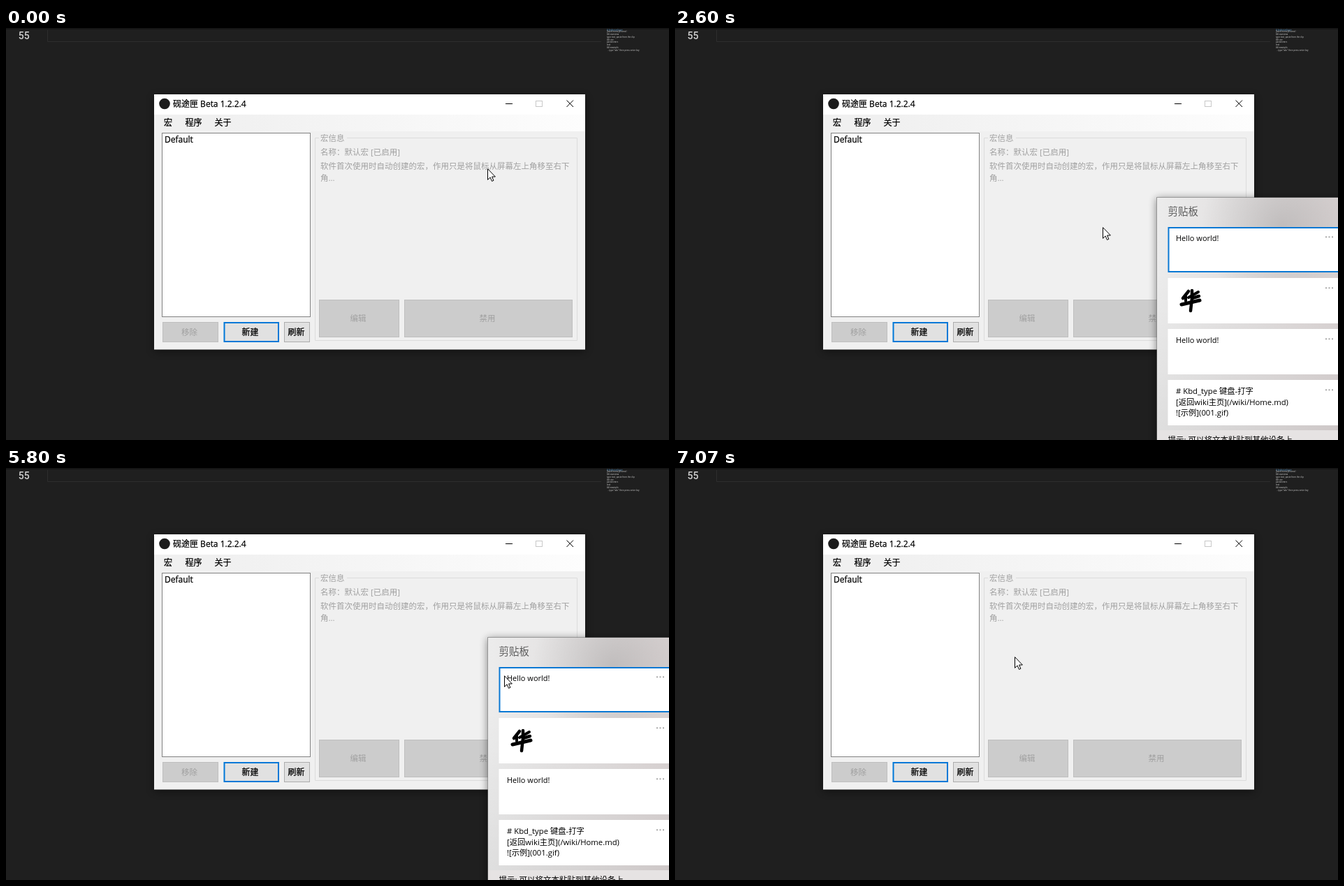
Animation, 949 px wide and 590 px high, one loop 8000 ms. Source, as an HTML page:

```html
<!DOCTYPE html>
<html lang="zh-CN">
<head>
<meta charset="utf-8">
<title>Macro window</title>
<style>
  html, body { margin: 0; width: 100%; height: 100%; overflow: hidden; background: #1f1f1f; }
  svg { display: block; width: 949px; height: 590px; }
  text { font: 11.5px "Open Sans", "Noto Sans CJK SC", "Noto Sans CJK", sans-serif; white-space: pre; }
  .bold { font-size: 12px; stroke: #000; stroke-width: .25px; }
  .grey { fill: #a0a0a0; }
  .mid { text-anchor: middle; }
  .off { fill: #ccc; stroke: #bfbfbf; }
  .clip text { font-size: 11.3px; }
  .clip .head { font-size: 14.5px; fill: #5c5c5c; }
  .clip .hello { font-size: 11px; }
  .clip .tip { font-size: 11.5px; }
  .line-no { font: 500 14px Roboto, sans-serif; fill: #d0d0d0; }
  .map text { font-size: 12px; fill: #d0d0d0; }
  .map .link { fill: #5a9bd0; }

  .px, .py, .panel, .body, .ring { animation: 8s infinite; }
  .px { animation-name: px; animation-timing-function: ease-in-out; }
  .py { animation-name: py; animation-timing-function: ease-in-out; }
  .panel { animation-name: panel; animation-timing-function: step-end; }
  .body { animation-name: body; animation-timing-function: step-end; }
  .ring { animation-name: ring; animation-timing-function: step-end; }

  @keyframes px {
    0%, 9.2% { transform: translateX(689px); }
    16.8% { transform: translateX(587px); }
    20%, 32.1% { transform: translateX(611px); }
    40.5% { transform: translateX(814px); }
    42.5%, 42.8% { transform: translateX(809px); }
    50.3% { transform: translateX(696px); }
    53.4%, 54.1% { transform: translateX(717px); }
    58.6% { transform: translateX(786px); }
    62.4% { transform: translateX(689px); }
    64.1%, 64.9% { transform: translateX(710px); }
    65.9%, 69% { transform: translateX(711px); }
    69.1%, 72.5% { transform: translateX(713px); }
    78%, 80% { transform: translateX(639px); }
    82.5% { transform: translateX(601px); animation-timing-function: ease-out; }
    88.3%, 100% { transform: translateX(486px); }
  }
  @keyframes py {
    0%, 9.2% { transform: translateY(201px); }
    20%, 32.3% { transform: translateY(285px); }
    36% { transform: translateY(274px); }
    41% { transform: translateY(304px); }
    42.5%, 42.8% { transform: translateY(302px); }
    46.4% { transform: translateY(319px); }
    51.2% { transform: translateY(278px); }
    53.4%, 54.1% { transform: translateY(281px); }
    59.5% { transform: translateY(312px); }
    64.1%, 64.9% { transform: translateY(302px); }
    65.9%, 69% { transform: translateY(296px); }
    69.1%, 72.5% { transform: translateY(297px); }
    78%, 80% { transform: translateY(290px); }
    82.5% { transform: translateY(289px); animation-timing-function: ease-out; }
    88.3%, 100% { transform: translateY(270px); }
  }
  @keyframes panel {
    0% { visibility: hidden; }
    24.1% { visibility: visible; }
    79%, 100% { visibility: hidden; }
  }
  @keyframes body {
    0% { opacity: 0; }
    25% { opacity: .65; }
    25.85%, 100% { opacity: 1; }
  }
  @keyframes ring {
    0% { opacity: 0; }
    78.3% { opacity: 1; }
    80%, 100% { opacity: 0; }
  }
</style>
</head>
<body>
<svg viewBox="0 0 949 590" xmlns="http://www.w3.org/2000/svg">
  <defs>
    <linearGradient id="menu">
      <stop offset=".15" stop-color="#f0f0f0"/><stop offset="1" stop-color="#fdfdfd"/>
    </linearGradient>
    <linearGradient id="glass">
      <stop offset="0" stop-color="#ececec"/><stop offset=".4" stop-color="#e4e2e2"/>
      <stop offset="1" stop-color="#dad4d4"/>
    </linearGradient>
    <radialGradient id="smoke" gradientUnits="userSpaceOnUse" cx="868" cy="285" r="115">
      <stop offset="0" stop-opacity=".14"/><stop offset="1" stop-opacity="0"/>
    </radialGradient>
    <linearGradient id="shade" x2="0" y2="1">
      <stop offset=".3" stop-opacity="0"/><stop offset="1" stop-opacity=".06"/>
    </linearGradient>
    <filter id="blur" x="-20%" y="-20%" width="140%" height="140%"><feGaussianBlur stdDeviation="6"/></filter>
    <clipPath id="outside"><path d="M0 0H949V242H689V590H0Z"/></clipPath>
    <g id="dots" fill="#999">
      <rect x="931" width="2" height="1.6"/><rect x="935.5" width="2" height="1.6"/><rect x="940" width="2" height="1.6"/>
    </g>
  </defs>

  <!-- editor -->
  <rect width="949" height="590" fill="#1f1f1f"/>
  <rect width="949" height="2" fill="#151515"/>
  <path d="M59.5 3V19.5H852" fill="none" stroke="#2d2d2d"/>
  <text class="line-no" x="17.8" y="15.6">55</text>
  <g class="map" transform="translate(860 0) scale(.25)">
    <text class="link" y="14"># keyboard type</text>
    <text y="24">[back home](/home)</text>
    <text y="40">## overview</text>
    <text y="56">type text, paste from the clip</text>
    <text y="72">## use</text>
    <text y="85">parameters</text>
    <text y="101">text</text>
    <text y="116">## example</text>
    <text x="6" y="130">- type "abc" then press enter key</text>
  </g>

  <!-- window -->
  <rect x="212" y="98" width="617" height="365" opacity=".45" filter="url(#blur)"/>
  <rect x="212" y="95" width="617" height="365.5" fill="#f0f0f0"/>
  <rect x="212" y="95" width="617" height="29" fill="#fff"/>
  <rect x="212" y="124" width="617" height="24" fill="url(#menu)"/>
  <circle cx="227" cy="108.5" r="7.8" fill="#1c1c1c"/>
  <path d="M715 108.5H725M802.5 103.5L812 113M812 103.5L802.5 113" stroke="#000"/>
  <rect x="758.5" y="104.5" width="9" height="8" fill="none" stroke="#c8c8c8"/>

  <rect x="223.5" y="150.5" width="212" height="263" fill="#fff" stroke="#828282"/>
  <rect class="off" x="224.5" y="421.5" width="79" height="28"/>
  <rect x="312.5" y="422" width="77.5" height="27" fill="#e1e1e1" stroke="#0078d7" stroke-width="2"/>
  <rect x="398.5" y="421.5" width="36" height="28" fill="#e1e1e1" stroke="#adadad"/>
  <g class="bold-set">
    <text class="bold" x="239" y="113">砚途匣 Beta 1.2.2.4</text>
    <text class="bold" x="226" y="140">宏</text>
    <text class="bold" x="256.5" y="140">程序</text>
    <text class="bold" x="298.5" y="140">关于</text>
    <text class="bold" x="227" y="164">Default</text>
    <text class="bold mid" x="349.5" y="439.5">新建</text>
    <text class="bold mid" x="415.5" y="439.5">刷新</text>
  </g>
  <text class="grey mid" x="262.5" y="439.5">移除</text>

  <path d="M448 157.5H442.5V447.5H817.5V157.5H488" fill="none" stroke="#dcdcdc"/>
  <g class="grey">
    <text x="450" y="162">宏信息</text>
    <text x="450" y="182">名称：默认宏 [已启用]</text>
    <text x="450" y="202">软件首次使用时自动创建的宏，作用只是将鼠标从屏幕左上角移至右下</text>
    <text x="450" y="218.5">角...</text>
  </g>
  <rect class="off" x="448.5" y="389.5" width="114" height="53"/>
  <rect class="off" x="570.5" y="389.5" width="240" height="53"/>
  <text class="grey mid" x="504" y="420">编辑</text>
  <text class="grey mid" x="689" y="420">禁用</text>

  <!-- clipboard panel -->
  <g class="panel">
    <g clip-path="url(#outside)">
      <rect x="689" y="244" width="300" height="400" opacity=".45" filter="url(#blur)"/>
    </g>
    <g class="body clip">
      <rect x="690" y="243" width="259" height="347" fill="url(#glass)"/>
      <rect x="690" y="243" width="259" height="347" fill="url(#smoke)"/>
      <rect x="690" y="243" width="259" height="347" fill="url(#shade)"/>
      <rect x="690" y="576" width="259" height="14" fill="#e6e3e3"/>
      <text class="head" x="705.5" y="267.5">剪贴板</text>
      <g fill="#fff">
        <rect x="706.5" y="286" width="260" height="63" stroke="#0a78d4" stroke-width="2"/>
        <rect x="705.5" y="358" width="244" height="65"/>
        <rect x="705.5" y="431" width="244" height="65"/>
        <rect x="705.5" y="504" width="244" height="65"/>
      </g>
      <use href="#dots" y="298.5"/><use href="#dots" y="371.5"/>
      <use href="#dots" y="444.5"/><use href="#dots" y="517.5"/>
      <text class="hello" x="717" y="305">Hello world!</text>
      <g fill="none" stroke="#000" stroke-linecap="round" stroke-linejoin="round">
        <path d="M735 377L727 387M740 376V387L750 384" stroke-width="4.5"/>
        <path d="M731 383V391M749 378L735 386" stroke-width="4"/>
        <path d="M725 396L751 390" stroke-width="5"/>
        <path d="M740 387L738 405" stroke-width="4.5"/>
      </g>
      <text class="hello" x="717" y="451">Hello world!</text>
      <text x="717" y="523.5"># Kbd_type 键盘-打字</text>
      <text x="717" y="539.5">[返回wiki主页](/wiki/Home.md)</text>
      <text x="717" y="554.5">![示例](001.gif)</text>
      <text class="tip" x="705.5" y="593.5">提示: 可以将文本粘贴到其他设备上</text>
    </g>
    <path d="M949 242.5H689.5V590" fill="none" stroke="#5a5a5a" stroke-opacity=".6"/>
  </g>

  <!-- pointer -->
  <g class="px"><g class="py">
    <circle class="ring" cx="-.5" cy="0" r="10.8" fill="none" stroke="#f87673" stroke-width="5"/>
    <path d="M.5 .7V16.3L4.1 12.9L6.5 18.4L8.9 17.4L6.6 12H11.4Z" fill="#fff" stroke="#000"/>
  </g></g>
</svg>
</body>
</html>
```
